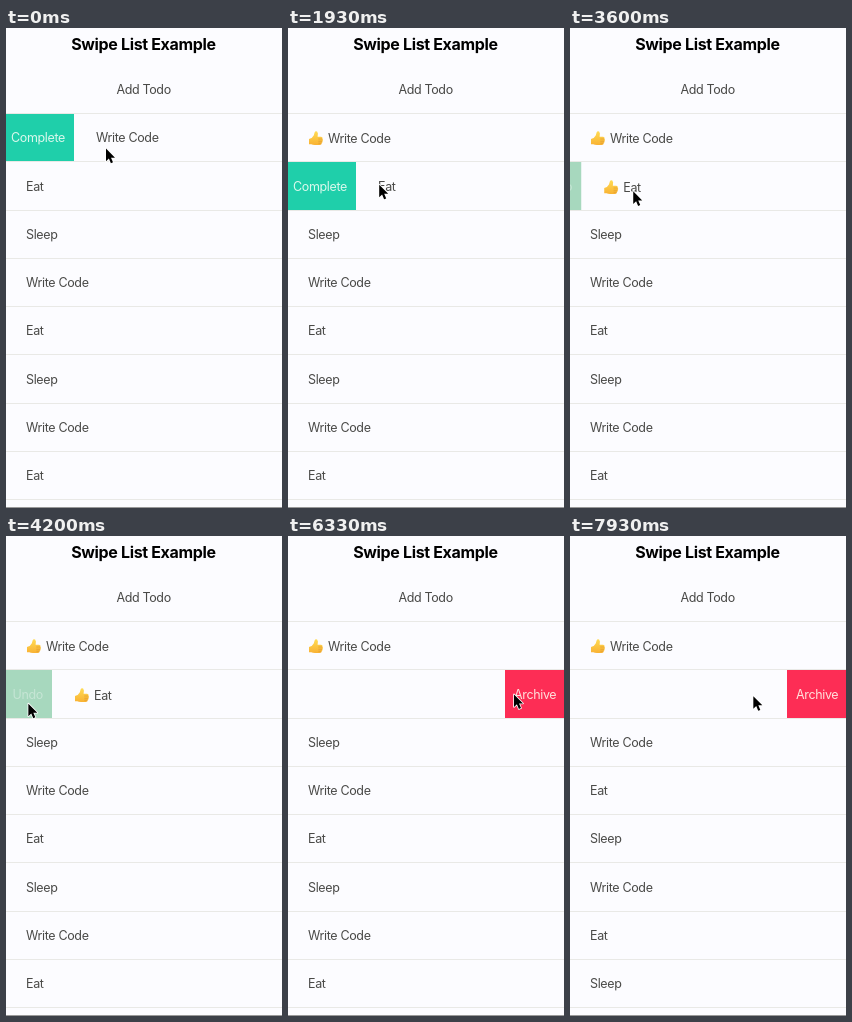
An HTML page with a canvas for the animation above (8 s loop, 276 px wide and 480 px high).

```html
<!DOCTYPE html>
<html lang="en">
<head>
<meta charset="utf-8">
<title>Swipe List Example</title>
<style>
  html, body { margin: 0; width: 100%; height: 100%; overflow: hidden; background: #fcfcff; }
  canvas { display: block; width: 276px; height: 480px; }
</style>
</head>
<body>
<canvas></canvas>
<script>
const W = 276, H = 480, LOOP = 8000, STEP = LOOP / 120;
const LIST_TOP = 85, PITCH = 48.25;
const SWIPE_MS = 500, TAP_MS = 100, CLOSE_MS = 370, FADE_MS = 1000, COLLAPSE_MS = 320;
const BG = '#fcfcff', TEXT = '#4a4a48', LINE = '#e9e9e6';
const TEAL = [31, 207, 170], PALE = [167, 216, 190];
const NAMES = ['Write Code', 'Eat', 'Sleep'];

const canvas = document.querySelector('canvas');
const ctx = canvas.getContext('2d');
const dpr = window.devicePixelRatio || 1;
canvas.width = W * dpr;
canvas.height = H * dpr;
ctx.scale(dpr, dpr);

const clamp = (v, lo = 0, hi = 1) => Math.min(hi, Math.max(lo, v));
const mix = (a, b, p) => a + (b - a) * p;
const progress = (t, start, length) => clamp((t - start) / length);
const ease = (t, start, length) => {
  const p = progress(t, start, length);
  return p * p * (3 - 2 * p);
};

// `open` is the action width: positive on the left, negative on the right
const swipe = (row, start, from, to, open) =>
  ({ kind: 'swipe', row, start, end: start + SWIPE_MS, from, to, open });
const tap = (kind, row, start, x) =>
  ({ kind, row, start, end: start + TAP_MS, from: x, to: x });

const gestures = [
  swipe(0, -500, 30, 100, 68),
  tap('toggle', 0, 480, 36),
  swipe(1, 1150, 38, 108, 68),
  tap('toggle', 1, 2430, 52),
  swipe(1, 3450, 52, 104, 46),
  tap('toggle', 1, 4210, 22),
  swipe(1, 4850, 190, 56, -59),
  tap('archive', 1, 6400, 228),
  swipe(2, 7000, 246, 172, -59),
  tap('archive', 2, 9000, 228)
];
const archive = gestures.find(g => g.kind === 'archive');

const lastOf = (kind, row, t) =>
  gestures.findLast(g => g.kind === kind && g.row === row && g.start <= t);

function pointerAt(t) {
  const i = gestures.findLastIndex(g => g.start <= t);
  const g = gestures[i], next = gestures[i + 1];
  const centre = row => LIST_TOP + PITCH * (Math.min(row, 1) + 0.5);
  const sway = 5 + 6.5 * Math.cos((t - 4665) / 4700 * 2 * Math.PI);
  const travel = ease(t, g.end, next.start - g.end);
  return {
    x: t < g.end ? mix(g.from, g.to, ease(t, g.start, SWIPE_MS)) : mix(g.to, next.from, travel),
    y: mix(centre(g.row), centre(next.row), travel) + sway
  };
}

function rowState(row, t) {
  const drag = lastOf('swipe', row, t);
  const toggle = lastOf('toggle', row, t);
  const toggles = gestures.filter(g => g.kind === 'toggle' && g.row === row && g.start <= t);
  const done = toggles.length % 2 === 1;
  const fade = toggle ? progress(t, toggle.start, FADE_MS) : 1;
  let reveal = 0;
  if (drag) {
    const travel = (drag.to - drag.from) * ease(t, drag.start, SWIPE_MS);
    reveal = clamp(travel, Math.min(0, drag.open), Math.max(0, drag.open));
    if (toggle && toggle.start > drag.start) reveal *= 1 - ease(t, toggle.start, CLOSE_MS);
  }
  return { reveal, done, level: done ? fade : 1 - fade };
}

function label(text, x, y, color = TEXT, align = 'left', font = '400 12.5px') {
  ctx.font = `${font} Inter, Roboto, sans-serif`;
  ctx.letterSpacing = '-0.35px';
  ctx.textAlign = align;
  ctx.fillStyle = color;
  ctx.fillText(text, x, y);
}

const thumbPath = new Path2D('M.5 8Q4 7 5.2 4.4L6.2 1.2Q7-.4 8.6.6Q10 2 9.1 5.7H12.6Q14.6 6 14 7.8Q15 8.9 14 10.1Q14.4 11.4 13.2 12.1Q13.2 14 11.4 14H6.5Q4 14 2.8 13.2H.5Z');
const fingerPath = new Path2D('M9.8 8H13.6M9.8 10.2H13.6M9.8 12.2H13');
const arrowPath = new Path2D('M0 0V12.6L2.9 9.9L4.9 14.6L7 13.7L5 9.1H9Z');

function thumb(x, y) {
  ctx.save();
  ctx.translate(x, y);
  const shade = ctx.createLinearGradient(0, 0, 0, 14);
  shade.addColorStop(0, '#ffdc55');
  shade.addColorStop(1, '#f9b233');
  ctx.fillStyle = shade;
  ctx.fill(thumbPath);
  ctx.strokeStyle = '#d8942a';
  ctx.lineWidth = 0.6;
  ctx.stroke(fingerPath);
  ctx.restore();
}

function arrow({ x, y }) {
  ctx.save();
  ctx.translate(x, y);
  ctx.lineJoin = 'round';
  ctx.lineWidth = 1.6;
  ctx.strokeStyle = '#fff';
  ctx.stroke(arrowPath);
  ctx.fillStyle = '#000';
  ctx.fill(arrowPath);
  ctx.restore();
}

function drawRow(row, top, height, t) {
  const { reveal, done, level } = rowState(row, t);
  const y = Math.round(top) + 1;
  const base = Math.round(top + PITCH / 2 + 5.3);

  ctx.save();
  ctx.beginPath();
  ctx.rect(0, y, W, height);
  ctx.clip();
  ctx.fillStyle = BG;
  ctx.fillRect(0, y, W, height);

  if (reveal > 0) {
    ctx.fillStyle = `rgb(${TEAL.map((v, k) => Math.round(mix(v, PALE[k], level)))})`;
    ctx.fillRect(0, y, reveal, height);
    label(done ? 'Undo' : 'Complete', reveal - 9, base,
      done ? 'rgba(255,255,255,.35)' : '#d9f8ec', 'right');
  } else if (reveal < 0) {
    ctx.fillStyle = '#fd2d55';
    ctx.fillRect(W + reveal, y, -reveal, height);
    label('Archive', W + reveal + 9, base, '#ffe0dc');
  }

  // The emoji makes the text line one pixel taller
  const x = 20 + reveal + clamp(reveal, 0, 2);
  if (done) thumb(x + 0.5, base - 11);
  label(NAMES[row % 3], x + (done ? 20 : 0), base + (done ? 1 : 0));
  ctx.restore();
}

function rule(y, color) {
  ctx.fillStyle = color;
  ctx.fillRect(0, Math.round(y), W, 1);
}

function draw(t) {
  ctx.fillStyle = BG;
  ctx.fillRect(0, 0, W, H);
  label('Swipe List Example', 137.4, 22, '#000', 'center', '700 16px');
  label('Add Todo', 137.6, 66, TEXT, 'center');
  rule(LIST_TOP, LINE);

  const removed = ease(t, archive.start, COLLAPSE_MS);
  let top = LIST_TOP;
  for (let row = 0; top < H; row++) {
    const height = row === archive.row ? PITCH * (1 - removed) : PITCH;
    if (height === 0) continue;
    drawRow(row, top, height, t);
    top += height;
    rule(top, LINE);
  }
  rule(H - 1, '#999');
  arrow(pointerAt(t));
}

const start = performance.now();
function tick() {
  const t = (performance.now() - start) % LOOP;
  draw(Math.floor((t + 4) / STEP) * STEP % LOOP);
  requestAnimationFrame(tick);
}
tick();
</script>
</body>
</html>
```
